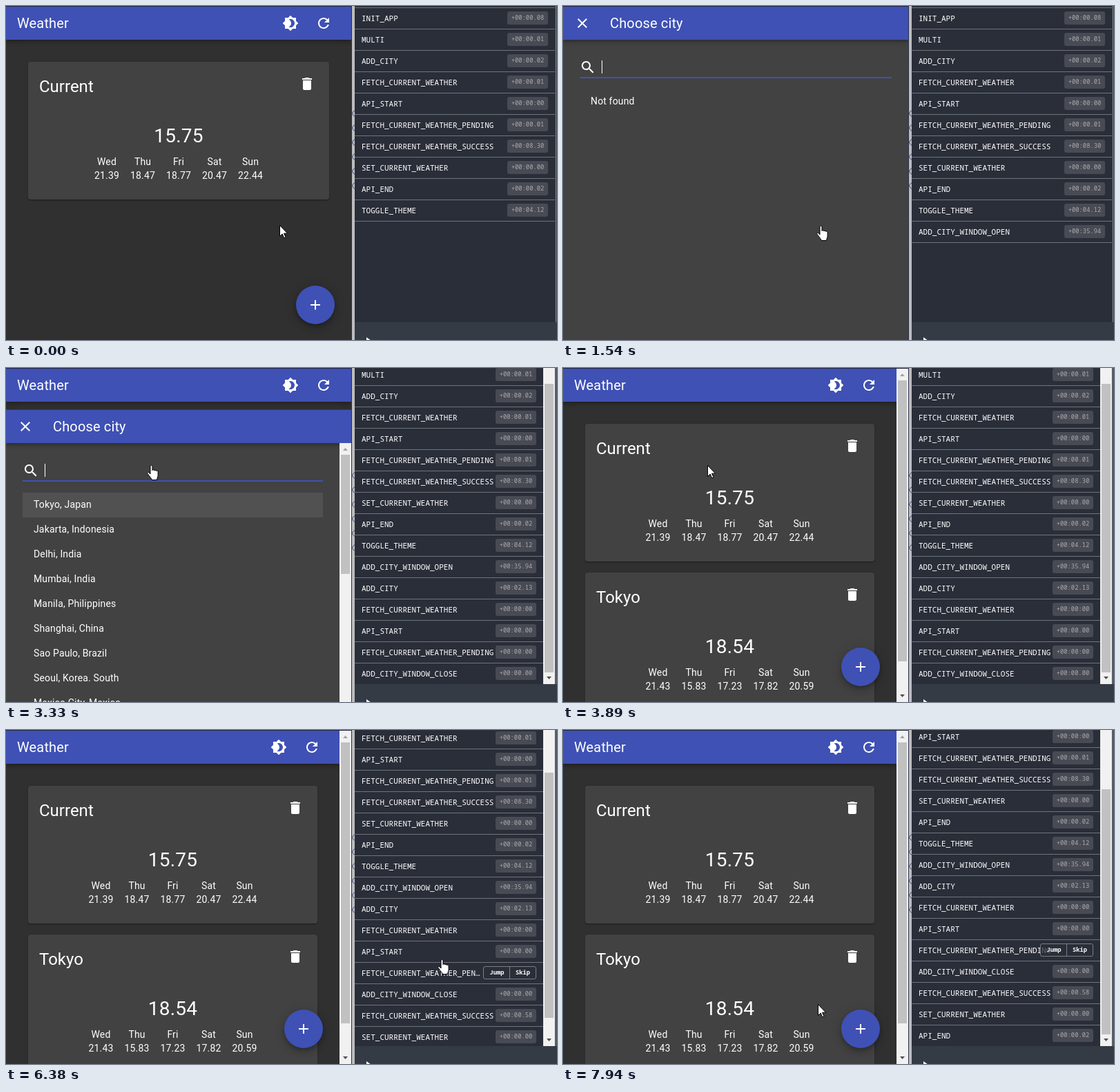
Recreate the animation shown at these times as an HTML page. Size 798 by 485 pixels, loop 8 s.

```html
<!DOCTYPE html>
<html lang="en">
<head>
<meta charset="utf-8">
<title>Weather</title>
<style>
html, body { margin: 0; width: 100%; height: 100%; overflow: hidden; background: #303030; }
#stage { position: relative; width: 798px; height: 485px; overflow: hidden; color: #fff; font: 14px/20px Roboto, sans-serif; letter-spacing: .15px; }
#stage div, #stage svg { position: absolute; white-space: nowrap; box-sizing: border-box; }
svg { fill: #fff; overflow: visible; }
#app { left: 0; top: 0; width: 500px; height: 485px; overflow: hidden; background: #303030; }
#page { left: 0; top: 0; height: 485px; }
.bar { left: 0; right: 0; top: 1px; height: 48px; background: #3f51b5; font-size: 20px; line-height: 48px;
  box-shadow: 0 2px 4px -1px rgba(0,0,0,.2), 0 4px 5px rgba(0,0,0,.14), 0 1px 10px rgba(0,0,0,.12); }
.card { left: 32px; right: 32px; height: 200px; border-radius: 4px; background: #424242;
  box-shadow: 0 1px 3px rgba(0,0,0,.2), 0 1px 1px rgba(0,0,0,.14), 0 2px 1px -1px rgba(0,0,0,.12); }
.name { left: 16px; top: 20px; font-size: 24px; line-height: 32px; letter-spacing: 0; }
.now { left: 0; right: 0; top: 93px; text-align: center; font-size: 28px; line-height: 30px; letter-spacing: .2px; }
.day { top: 135px; width: 52px; text-align: center; }
#fab { right: 24px; top: 406px; width: 56px; height: 56px; border-radius: 50%;
  box-shadow: 0 3px 5px -1px rgba(0,0,0,.2), 0 6px 10px rgba(0,0,0,.14), 0 1px 18px rgba(0,0,0,.12); }
#dialog { left: 0; top: 0; width: 500px; height: 485px; background: #424242; }
#line { left: 24px; top: 103px; height: 2px; background: #3f51b5; }
#caret { left: 56px; top: 79px; width: 1px; height: 19px; background: #fff; }
.city { left: 24px; width: 435px; height: 36px; line-height: 35px; padding-left: 16px; }
.scroll { width: 17px; background: #f1f1f1; }
.thumb { left: 2px; width: 13px; background: #c1c1c1; }
#panel { left: 505px; top: 0; width: 293px; height: 485px; background: #353b45; letter-spacing: 0;
  font: 500 11px/30px "Noto Sans Mono", "DejaVu Sans Mono", monospace; }
#log { left: 0; top: 0; width: 290px; height: 459px; overflow: hidden; background: #2a2e39; }
#rows { left: 0; border-top: 1px solid #70737b; }
.row { left: 0; right: 0; height: 31px; border-bottom: 1px solid #70737b; }
.label { left: 10px; }
.chip { right: 10px; top: 5px; width: 59px; height: 19px; border-radius: 3px; background: #484b54; color: #a9abaf;
  font-size: 8.8px; line-height: 18px; text-align: center; }
.acts { right: 10px; top: 5px; width: 77px; height: 19px; border: 1px solid #7b7e86; border-radius: 3px;
  background: rgba(42,46,57,.75); font-size: 8.8px; font-weight: 700; line-height: 17px; text-align: center; }
.acts div { top: 0; width: 38px; height: 17px; }
.acts div + div { left: 37px; border-left: 1px solid #7b7e86; }
#edge { left: 291px; top: 0; width: 1px; height: 459px; background: #85878d; }
#split { left: 500px; top: 0; width: 5px; height: 485px; background: #bdbdbd; border-left: 1px solid #283050; overflow: hidden; }
#top { left: 0; top: 0; width: 500px; height: 1px; background: #20263f; }
#cursor path { stroke: #000; stroke-width: 1; stroke-linejoin: round; }
</style>
</head>
<body>
<div id="stage">
  <div id="app">
    <div id="page"></div>
    <div id="dialog"></div>
  </div>
  <div id="top"></div>
  <div id="split"></div>
  <div id="panel"><div id="log"><div id="rows"></div></div><div id="edge"></div></div>
</div>
<script>
const ICONS = {
  theme: "M20 8.69V4h-4.69L12 .69 8.69 4H4v4.69L.69 12 4 15.31V20h4.69L12 23.31 15.31 20H20v-4.69L23.31 12 20 8.69zM12 18c-.89 0-1.74-.2-2.5-.55C11.56 16.5 13 14.42 13 12s-1.44-4.5-3.5-5.45C10.26 6.2 11.11 6 12 6c3.31 0 6 2.69 6 6s-2.69 6-6 6z",
  refresh: "M17.65 6.35C16.2 4.9 14.21 4 12 4c-4.42 0-7.99 3.58-7.99 8s3.57 8 7.99 8c3.73 0 6.84-2.55 7.73-6h-2.08c-.82 2.33-3.04 4-5.65 4-3.31 0-6-2.69-6-6s2.69-6 6-6c1.66 0 3.14.69 4.22 1.78L13 11h7V4l-2.35 2.35z",
  trash: "M6 19c0 1.1.9 2 2 2h8c1.1 0 2-.9 2-2V7H6v12zM19 4h-3.5l-1-1h-5l-1 1H5v2h14V4z",
  add: "M19 13h-6v6h-2v-6H5v-2h6V5h2v6h6v2z",
  close: "M19 6.41L17.59 5 12 10.59 6.41 5 5 6.41 10.59 12 5 17.59 6.41 19 12 13.41 17.59 19 19 17.59 13.41 12z",
  search: "M15.5 14h-.79l-.28-.27C15.41 12.59 16 11.11 16 9.5 16 5.91 13.09 3 9.5 3S3 5.91 3 9.5 5.91 16 9.5 16c1.61 0 3.09-.59 4.23-1.57l.27.28v.79l5 4.99L20.49 19l-4.99-5zm-6 0C7.01 14 5 11.99 5 9.5S7.01 5 9.5 5 14 7.01 14 9.5 11.99 14 9.5 14z"
};
const ARROW = "M.5.5v16l3.7-3.5 2.5 5.8 2.3-1-2.5-5.6h5.1z";
const HAND = "M5 2c0-2 3-2 3 0v5.6c.2-1.3 2.6-1.2 2.8.4.3-1.2 2.5-1 2.7.6.4-1 2.6-.7 2.6 1.1v5c0 3-1.5 4-1.5 6.8H7c0-2-2-3.6-3.5-5.8L.9 12.2c-.8-1.4 1-2.6 2.2-1.3L5 13z";
const DAYS = ["Wed", "Thu", "Fri", "Sat", "Sun"];
const CITIES = ["Tokyo, Japan", "Jakarta, Indonesia", "Delhi, India", "Mumbai, India", "Manila, Philippines",
  "Shanghai, China", "Sao Paulo, Brazil", "Seoul, Korea. South", "Mexico City, Mexico", "Guangzhou, China"];
const FETCH = "FETCH_CURRENT_WEATHER";
const LOG = [
  ["INIT_APP", "00.08"], ["MULTI", "00.01"], ["ADD_CITY", "00.02"], [FETCH, "00.01"], ["API_START", "00:00"],
  [FETCH + "_PENDING", "00.01"], [FETCH + "_SUCCESS", "08.30"], ["SET_CURRENT_WEATHER", "00.00"], ["API_END", "00.02"],
  ["TOGGLE_THEME", "04.12"], ["ADD_CITY_WINDOW_OPEN", "35.94"], ["ADD_CITY", "02.13"], [FETCH, "00:00"],
  ["API_START", "00.00"], [FETCH + "_PENDING", "00:00"], ["ADD_CITY_WINDOW_CLOSE", "00.00"],
  [FETCH + "_SUCCESS", "00.58"], ["SET_CURRENT_WEATHER", "00.00"], ["API_END", "00.02"]
];
const PENDING = 14, CLOSE = 15;

// time, x, y of the pointer's hot spot
const POINTER = [[0, 396, 318], [190, 396, 318], [480, 424, 384], [760, 446, 434], [1300, 446, 434], [1540, 372, 320],
  [1770, 297, 195], [1850, 285, 187], [2150, 235, 153], [2460, 209, 141], [4200, 209, 141], [4660, 536, 357],
  [4830, 536, 357], [4900, 582, 344], [5060, 630, 333], [7720, 630, 333], [7780, 570, 360], [7860, 460, 394],
  [7940, 369, 398], [8000, 369, 398]];
const SCROLL = [[4200, 132], [6320, 132], [6380, 100], [6450, 62], [6520, 32], [6600, 15], [7010, 15], [7070, 55], [7150, 105], [7230, 132]];

const $ = id => document.getElementById(id);
function box(parent, cls, text, style) {
  const el = document.createElement("div");
  if (cls) el.className = cls;
  if (text) el.textContent = text;
  Object.assign(el.style, style);
  return parent.appendChild(el);
}
function svg(parent, d, style, size = 24) {
  const holder = document.createElement("template");
  holder.innerHTML = `<svg width="${size}" height="${size}"><path d="${d}"/></svg>`;
  const el = holder.content.firstChild;
  Object.assign(el.style, style);
  return parent.appendChild(el);
}
function withId(el, id) { el.id = id; return el; }
function show(el, on) { el.style.display = on ? "" : "none"; }
const clamp = v => Math.min(1, Math.max(0, v));
const ramp = (t, a, b) => clamp((t - a) / (b - a));
const easeOut = p => 1 - (1 - p) ** 3;
function track(table, t) {
  const i = table.findIndex(k => k[0] > t);
  if (i === 0) return table[0].slice(1);
  if (i < 0) return table[table.length - 1].slice(1);
  const a = table[i - 1], b = table[i], p = (t - a[0]) / (b[0] - a[0]);
  return a.slice(1).map((v, j) => v + (b[j + 1] - v) * p);
}

function scrollbar(parent, left, top, bottom, upColor) {
  const el = box(parent, "scroll", "", { left: left + "px", top: top + "px", height: bottom - top + "px" });
  svg(el, "M5 11l3.5-4 3.5 4z", { left: 0, top: 0, fill: upColor }, 17);
  svg(el, "M5 6l3.5 4 3.5-4z", { left: 0, bottom: 0, fill: "#505050" }, 17);
  el.thumb = box(el, "thumb");
  return el;
}
function setThumb(bar, top, height) {
  bar.thumb.style.top = top + "px";
  bar.thumb.style.height = height + "px";
}

function card(name, top, now, temps) {
  const el = box($("page"), "card", "", { top: top + "px" });
  box(el, "name", name);
  svg(el, ICONS.trash, { right: "20px", top: "20px" });
  box(el, "now", now);
  DAYS.forEach((day, i) => {
    const left = `calc(50% + ${i * 52 - 130}px)`;
    box(el, "day", day, { left });
    box(el, "day", temps[i], { left, top: "155px" });
  });
  return el;
}

card("Current", 81, "15.75", ["21.39", "18.47", "18.77", "20.47", "22.44"]);
const tokyo = card("Tokyo", 297, "18.54", ["21.43", "15.83", "17.23", "17.82", "20.59"]);
const bar = box($("page"), "bar");
box(bar, "", "Weather", { left: "16px" });
svg(bar, ICONS.theme, { right: "76px", top: "12px" });
svg(bar, ICONS.refresh, { right: "28px", top: "12px" });
const fab = withId(box($("page")), "fab");
svg(fab, ICONS.add, { left: "16px", top: "16px" });
const pageScroll = scrollbar($("app"), 483, 1, 485, "#a3a3a3");
$("app").insertBefore(pageScroll, $("dialog"));
setThumb(pageScroll, 17, 408);

const dialog = $("dialog");
const head = box(dialog, "bar");
svg(head, ICONS.close, { left: "16px", top: "12px" });
box(head, "", "Choose city", { left: "68px" });
svg(dialog, ICONS.search, { left: "24px", top: "77px" });
const line = withId(box(dialog), "line");
const caret = withId(box(dialog), "caret");
const empty = box(dialog, "", "Not found", { left: "40px", top: "128px" });
const list = box(dialog, "", "", { left: 0, top: 0 });
CITIES.forEach((city, i) => box(list, "city", city, { top: 121 + 36 * i + "px", background: i ? "" : "#515151" }));
setThumb(scrollbar(list, 483, 49, 485, "#a3a3a3"), 17, 173);

const rows = LOG.map(([label, time], i) => {
  const el = box($("rows"), "row", "", { top: 31 * i + "px" });
  el.label = box(el, "label", label);
  el.chip = box(el, "chip", "+00:" + time);
  el.acts = box(el, "acts");
  box(el.acts, "", "Jump", { left: 0 });
  box(el.acts, "", "Skip");
  return el;
});
const logScroll = scrollbar($("log"), 273, -28, 459, "#505050");
svg($("panel"), "M0 0l7 5-7 5z", { left: "17px", top: "481px" }, 10);
for (let i = 0; i < 6; i++)
  svg($("split"), "M5 0Q-4 5 5 10", { left: 0, top: 150.5 + 21.1 * i + "px", fill: "none", stroke: "#3b4a78" }, 10);

const cursor = withId(box($("stage")), "cursor");
const arrow = svg(cursor, ARROW, { left: 0, top: 0 });
const hand = svg(cursor, HAND, { left: "-5px", top: 0 });

// swaps the time chip for the buttons as p goes from 0 to 1
function flip(row, p) {
  row.chip.style.transform = `scaleY(${clamp(1 - p * 2)})`;
  row.acts.style.transform = `scaleY(${clamp((p - .28) / .72)})`;
  show(row.acts, p > .28);
}

function drawLog(t) {
  const count = t < 1100 ? 10 : t < 3250 ? 11 : t < 4200 ? 16 : 19;
  const full = count > 15;
  const scroll = count === 19 ? track(SCROLL, t)[0] : full ? 39 : 0;
  $("rows").style.top = 2 - Math.round(scroll) + "px";
  $("rows").style.width = (full ? 273 : 290) + "px";
  rows.forEach((row, i) => { show(row, i < count); flip(row, 0); });
  show(logScroll, full);
  if (count === 19) setThumb(logScroll, 17 + scroll * .735, 356);
  else setThumb(logScroll, 51, 419);
  const swap = ramp(t, 5210, 5500);
  flip(rows[CLOSE], ramp(t, 4830, 5060) * (1 - swap));
  flip(rows[PENDING], swap);
  const cut = t >= 5210 && t < 7770;
  rows[PENDING].label.textContent = cut ? FETCH + "_PEN…" : LOG[PENDING][0];
}

function drawApp(t) {
  const added = t >= 3650;
  $("page").style.width = (added ? 483 : 500) + "px";
  show(tokyo, added);
  show(pageScroll, added);
  const hover = ramp(t, 560, 760) * (t < 3000 ? 1 : 0);
  const mix = (a, b) => Math.round(a + (b - a) * hover);
  fab.style.background = `rgb(${mix(63, 48)},${mix(81, 63)},${mix(181, 159)})`;

  const slide = t < 3000 ? 1 - easeOut(ramp(t, 1180, 1450)) : ramp(t, 3250, 3480) ** 2;
  show(dialog, t > 1180 && t < 3480);
  dialog.style.transform = slide ? `translateY(${Math.round(slide * 485)}px)` : "";
  const loaded = t >= 1690;
  show(empty, !loaded);
  show(list, loaded);
  line.style.width = (loaded ? 435 : 452) + "px";
  show(caret, Math.floor((t - 1190) / 530) % 2 === 0);
}

function drawCursor(t) {
  const [x, y] = track(POINTER, t);
  const pointing = (t > 560 && t < 3480) || (t > 4500 && t < 7800);
  cursor.style.transform = `translate(${Math.round(x)}px,${Math.round(y)}px)`;
  show(arrow, !pointing);
  show(hand, pointing);
}

const start = performance.now();
function frame() {
  const t = (performance.now() - start) % 8000;
  drawApp(t);
  drawLog(t);
  drawCursor(t);
  requestAnimationFrame(frame);
}
frame();
</script>
</body>
</html>
```
